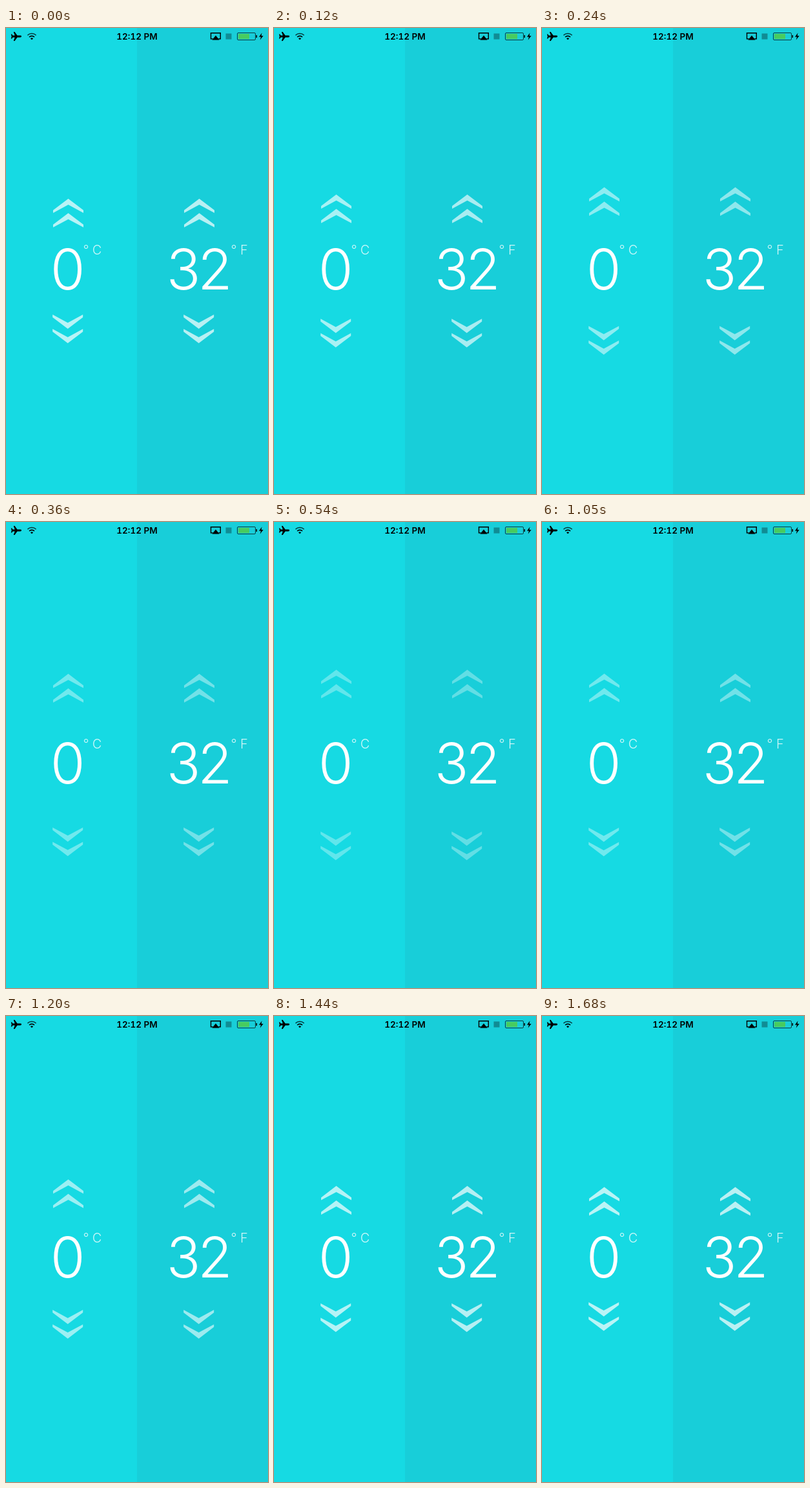
An HTML page for the animation above (1710 ms loop, 406 by 720 pixels).

```html
<!DOCTYPE html>
<html lang="en">
<head>
<meta charset="utf-8">
<style>
html, body { margin: 0; width: 100%; height: 100%; overflow: hidden; background: #16dae3; }
svg { display: block; width: 100vw; height: 100vh; }
text { font-family: Inter, "Liberation Sans", sans-serif; text-anchor: middle; }
.value { font-size: 87px; font-weight: 300; font-variation-settings: "opsz" 14; fill: #fff; }
.unit { font-size: 20px; font-weight: 300; fill: #fff; opacity: .8; }
.clock { font-size: 13.5px; font-weight: 600; font-feature-settings: "tnum"; }
</style>
</head>
<body>
<svg viewBox="0 0 406 720">
  <defs>
    <path id="chevron" d="M-23.5 17.8L0 0L23.5 17.8V22L0 9.4L-23.5 22Z"/>
    <g id="pair"><use href="#chevron"/><use href="#chevron" y="22.3"/></g>
  </defs>
  <rect width="406" height="720" fill="#16dae3"/>
  <rect x="203" width="203" height="720" fill="#18ced9"/>

  <!-- status bar -->
  <path d="M24 13q0-1.4-2-1.4h-4.5L13.5 6h-1.8l2 5.6h-3.3L9 9.6H7.8l.9 3.4-.9 3.4H9l1.4-2h3.3l-2 5.6h1.8l4-5.6H22q2 0 2-1.4z"/>
  <g fill="none" stroke="#000" stroke-width="1.6">
    <path d="M33.4 11.2a9.4 9.4 0 0 1 13.2 0" opacity=".75"/>
    <path d="M36 14a5.7 5.7 0 0 1 8 0"/>
  </g>
  <path d="M37.9 16.2a3.1 3.1 0 0 1 4.2 0L40 18.3z"/>
  <text class="clock" x="203" y="18.2">12:12 PM</text>
  <path d="M320.5 16.8h-3V7.7h14.8v9.1h-3" fill="none" stroke="#000" stroke-width="1.4"/>
  <path d="M325 11.6l5.6 6.9h-11.2z"/>
  <rect x="340.5" y="8.5" width="9" height="9" fill="#108c94"/>
  <rect x="358.5" y="7.5" width="28" height="11" rx="1.5" fill="none" stroke="#0a3f42"/>
  <rect x="360" y="9" width="17" height="8" fill="#48cb60"/>
  <path d="M387.5 11h1.5v4h-1.5z"/>
  <path d="M396.5 7.5l-4.5 6.3h3l-1.3 4.7 5-6.6h-3z"/>

  <g class="arrows" fill="#fff">
    <g id="up"><use href="#pair" x="96.5" y="264.2"/><use href="#pair" x="299.5" y="264.2"/></g>
    <g id="down">
      <use href="#pair" transform="translate(95.7 486.6) scale(1 -1)"/>
      <use href="#pair" transform="translate(298.7 486.6) scale(1 -1)"/>
    </g>
  </g>

  <text class="value" x="95.6" y="404">0</text>
  <text class="value" x="275" y="404">3</text>
  <text class="value" x="324" y="404">2</text>
  <g class="unit">
    <text x="124" y="350">°</text><text x="141" y="350">C</text>
    <text x="353" y="350">°</text><text x="369" y="350">F</text>
  </g>
</svg>
<script>
const LOOP = 1710, STEP = 30, TRAVEL = 38;
// [ms, distance of the arrows from rest]
const keys = [[-120, 0], [0, .5], [120, 7], [240, 18.2], [360, 29.6], [450, 33.6], [540, 36],
  [700, 37.6], [840, 37.8], [930, 36.5], [1080, 27.5], [1200, 11.8], [1320, 4.9],
  [1440, 1.6], [1560, .4], [1680, 0], [1800, 0]];

const slope = i => (keys[i + 1][1] - keys[i - 1][1]) / (keys[i + 1][0] - keys[i - 1][0]);

// Cubic curve through the keys
function distance(t) {
  let i = 1;
  while (i < keys.length - 3 && t >= keys[i + 1][0]) i++;
  const [t0, a] = keys[i], [t1, b] = keys[i + 1];
  const d = t1 - t0, s = Math.min(1, (t - t0) / d), r = 1 - s;
  return r * r * ((1 + 2 * s) * a + s * d * slope(i))
       + s * s * ((1 + 2 * r) * b - r * d * slope(i + 1));
}

const up = document.getElementById("up"), down = document.getElementById("down");
const arrows = document.querySelector(".arrows");

function draw(now) {
  const t = now % LOOP;
  const u = distance(t - t % STEP);
  up.setAttribute("transform", `translate(0 ${-u})`);
  down.setAttribute("transform", `translate(0 ${u})`);
  arrows.setAttribute("fill-opacity", .7 - .4 * u / TRAVEL);
}

let start;
function tick(now) {
  start ??= now;
  draw(now - start);
  requestAnimationFrame(tick);
}
draw(0);
requestAnimationFrame(tick);
</script>
</body>
</html>
```
